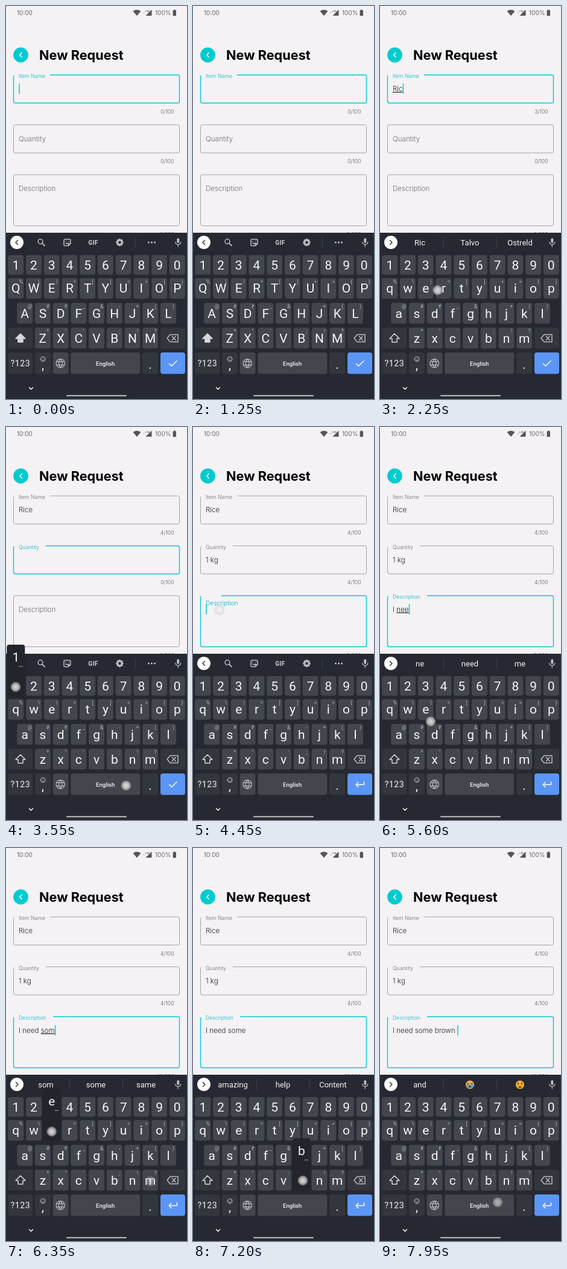
These frames come from a looping animation (300 px wide and 650 px high, 8 s). An HTML page:

```html
<!DOCTYPE html>
<html lang="en">
<head>
<meta charset="utf-8">
<title>New Request</title>
<style>
  html, body { margin: 0; width: 100%; height: 100%; overflow: hidden; background: #f4f2f5; }
  svg { display: block; width: 300px; height: 650px; }
  text { white-space: pre; }
  .app { font-family: Inter, sans-serif; font-weight: 300; font-size: 11.6px; fill: #222; }
  .app .title { font-weight: 700; font-size: 21.7px; fill: #000; }
  .app .status { font-size: 10px; font-weight: 400; fill: #66656a; }
  .app .count { font-size: 8.6px; fill: #555; text-anchor: end; }
  .word { text-decoration: underline; text-decoration-thickness: 1px; text-underline-offset: 2px; }
  .kb { font-family: Roboto, sans-serif; font-size: 21px; fill: #f3f4f6; text-anchor: middle; }
  .kb .hint { font-size: 8.5px; fill: #b0b3b9; }
  .kb .strip { font-size: 13px; }
  .kb .small { font-size: 9.6px; font-weight: 500; }
  .line { fill: none; stroke: #b9bcc2; stroke-width: 1.5; stroke-linecap: round; stroke-linejoin: round; }
</style>
</head>
<body>
<svg id="stage" viewBox="0 0 300 650"></svg>
<script>
const LOOP = 8000, LAG = 50, TEAL = '#00cbd0', GRAY = '#9a999d';
const stage = document.getElementById('stage');
const $ = id => document.getElementById(id);
const clamp = v => Math.max(0, Math.min(1, v));
const mix = (a, b, p) => a + (b - a) * p;

const fields = [
  { label: 'Item Name', y: 114, h: 46.5, base: 141, gap: 73, max: 100, focus: -500 },
  { label: 'Quantity', y: 196.5, h: 46.5, base: 224, gap: 66, max: 100, focus: 2890 },
  { label: 'Description', y: 279, h: 84.5, base: 305.7, gap: 78, max: 300, focus: 4375 }
];

// start, hold, key, optional touch point
const taps = [
  [1900, 70, 'r'], [1990, 60, 'i'], [2080, 60, 'c'], [2170, 60, 'e', 95.5, 470],
  [2750, 100, '', 70, 222],
  [3450, 120, '1', 16, 430], [3520, 90, ' ', 199, 593], [3720, 80, 'k'], [3950, 80, 'g'],
  [4250, 130, '', 43.5, 302.5],
  [4800, 80, 'i'], [4960, 60, ' '], [5120, 60, 'n'], [5270, 60, 'e'], [5400, 70, 'e'],
  [5500, 65, 'd', 84, 487], [5780, 60, ' '], [5950, 70, 's'], [6090, 70, 'o'],
  [6220, 60, 'm'], [6320, 60, 'e'], [6430, 60, ' '],
  [7195, 80, 'b', 182, 550], [7350, 60, 'r'], [7470, 60, 'o'], [7600, 60, 'w'],
  [7710, 60, 'n'], [7825, 70, ' ', 195, 586]
].map(([start, hold, key, x, y]) => ({ start, end: start + hold, key, x, y }));

const hints = {
  R: ['R', 'I', 'Are'], Ri: ['Ri', 'Rice', 'Right'], Ric: ['Ric', 'Talvo', 'Ostreld'],
  Rice: ['Rice', 'Rice is', 'Price'], '1 ': ['of', 'more', 'day'], k: ['k', 'kg', 'km'],
  kg: ['kg', 'kgs', 'keg'], i: ['i', 'I', "I'm"], 'I ': ['am', 'have', 'will'],
  n: ['n', 'no', 'need'], ne: ['ne', 'need', 'new'], nee: ['ne', 'need', 'me'],
  need: ['need', 'needed', 'needs'], 'need ': ['to', 'a', 'you'], s: ['s', 'some', 'so'],
  so: ['so', 'some', 'soon'], som: ['som', 'some', 'same'], some: ['some', 'someone', 'same'],
  'some ': ['amazing', 'help', 'Content'], b: ['b', 'be', 'but'], br: ['br', 'bread', 'bring'],
  bro: ['bro', 'brown', 'bring'], brow: ['brow', 'brown', 'brows'],
  brown: ['brown', 'browns', 'browse'], 'brown ': ['and', 'cry', 'tired']
};

// Keyboard layout
const rows = [
  { keys: '1234567890', marks: '', x: 16.3, y: 412, h: 32.5 },
  { keys: 'qwertyuiop', marks: '%\\|=[]<>{}', x: 16.3, y: 450, h: 34 },
  { keys: 'asdfghjkl', marks: '@#₹_&-+()', x: 31.2, y: 491, h: 34.5 },
  { keys: 'zxcvbnm', marks: '*"\':;!?', x: 60.9, y: 532, h: 34.5 }
];
const PITCH = 29.72, keyAt = { ' ': { x: 190, cy: 590 } };
const esc = s => s.replace('&', '&amp;').replace('<', '&lt;');
const box = (x, y, w, h, fill) => `<rect x="${x}" y="${y}" width="${w}" height="${h}" rx="4" fill="${fill}"/>`;
const text = (x, y, s, attrs = '') => `<text x="${x}" y="${y}" ${attrs}>${esc(s)}</text>`;
const line = (d, attrs = '') => `<path class="line" d="${d}" ${attrs}/>`;

const letterKeys = () => rows.map(r => [...r.keys].map((k, i) => {
  const x = r.x + i * PITCH, cy = r.y + r.h / 2;
  keyAt[k] = { x, cy, y: r.y };
  return box(x - 13, r.y, 26, r.h, '#43464d') +
    text(x, cy + 7.4, k, `data-key="${k}"`) +
    (r.marks ? text(x + 8.5, r.y + 8.5, r.marks[i], 'class="hint"') : '');
}).join('')).join('');

const specialKeys = () =>
  box(3.3, 532, 41, 34.5, '#33363d') + box(256, 532, 41, 34.5, '#33363d') +
  box(3.3, 573, 41, 35.5, '#33363d') + box(48, 573, 26, 35.5, '#33363d') +
  box(77.6, 573, 26, 35.5, '#43464d') + box(107.3, 573, 115, 35.5, '#43464d') +
  box(226, 573, 26, 35.5, '#33363d') + box(256, 573, 41, 35.5, '#5b95f6') +
  '<path id="shift" class="line" d="M24 542L32 550H28V556H20V550H16Z" style="stroke:#d5d7da"/>' +
  line('M267 549.5L272 543.5H285V555.5H272ZM275.5 546.5L281 552.5M281 546.5L275.5 552.5') +
  text(23.8, 596, '?123', 'style="font-size:14px;font-weight:500;letter-spacing:.5px;fill:#c9cbd0"') +
  text(61, 601, ',') + text(239, 600, '.') + text(164.7, 594.5, 'English', 'class="small"') +
  line('M57 584a4 4 0 1 0 8 0a4 4 0 1 0 -8 0M59 585.3q2 2.4 4 0M59.5 582.6v.2M62.5 582.6v.2', 'style="stroke-width:1"') +
  line('M83 591a7.2 7.2 0 1 0 14.4 0a7.2 7.2 0 1 0 -14.4 0M90.2 583.8q-6 7.2 0 14.4q6 -7.2 0 -14.4M84 588.3h12.4M84 593.7h12.4', 'style="stroke-width:1.2"') +
  line('M270.5 591.5L274.5 595.5L283 587', 'id="check" style="stroke:#fff"') +
  line('M283.5 587V591.5H270M274 587.5L270 591.5L274 595.5', 'id="return" style="stroke:#fff"');

const gear = () => {
  let d = '';
  for (let i = 0; i < 8; i++) {
    const a = i * Math.PI / 4, c = Math.cos(a), s = Math.sin(a);
    d += `M${188.5 + 4 * c} ${391 + 4 * s}L${188.5 + 6.2 * c} ${391 + 6.2 * s}`;
  }
  return line(d, 'style="stroke-width:3;stroke-linecap:butt"') +
    '<circle class="line" cx="188.5" cy="391" r="3.6" style="stroke-width:2.8"/>';
};

const toolbar = () => '<g id="tools">' +
  '<circle class="line" cx="57" cy="389.5" r="3.9"/>' + line('M60 392.5L64 396.5', 'style="stroke-width:1.8"') +
  line('M98 385.8H105Q107 385.8 107 387.8V393L103.5 396.5H98Q96 396.5 96 394.5V387.8Q96 385.8 98 385.8ZM107 393H103.5V396.5M99 392q2 2 4 0M99 389v.2M104 389v.2') +
  text(144.5, 394.6, 'GIF', 'style="font-size:10px;font-weight:900;fill:#b9bcc2;letter-spacing:.4px"') +
  gear() + '<path d="M214.5 383V399" stroke="#3c4048"/>' +
  [236.5, 241.5, 246.5].map(x => `<circle cx="${x}" cy="391" r="1.6" fill="#b9bcc2"/>`).join('') + '</g>';

const face = (x, extra) => `<g transform="translate(${x} 391.5)"><circle r="7" fill="#fbae3a"/>${extra}</g>`;

const suggestions = () => '<g id="words"><path d="M105.5 382V400M193.5 382V400" stroke="#3c4048"/>' +
  [66, 149, 232].map((x, i) => text(x, 395.8, '', `class="strip" id="word${i}"`)).join('') +
  '<g id="faces">' +
  face(149, '<path d="M-5-1.5h3.5v7.5h-3.5zM1.5-1.5h3.5v7.5h-3.5z" fill="#4a9ae8"/><path d="M-5-2h3.5M1.5-2h3.5" stroke="#5a3a1a"/><ellipse cy="3" rx="1.6" ry="2.3" fill="#5a3a1a"/>') +
  face(232, '<path d="M-4.5-3.5L-1.5-1.5L-4.5 0M4.5-3.5L1.5-1.5L4.5 0" fill="none" stroke="#5a3a1a"/><path d="M-3.5 5Q0-.5 3.5 5Z" fill="#7a3020"/>') +
  '</g></g>';

const statusBar = () => text(18, 14.6, '10:00', 'class="status"') + text(247, 14.6, '100%', 'class="status"') +
  '<g fill="#55545a"><path d="M210.5 8.6Q217 3.8 223.5 8.6L217 16.2Z"/><path d="M241.5 6V16H231.5Z"/>' +
  '<path d="M278 6h2.6v1.2h1.4v9h-5.4v-9h1.4z"/></g>' +
  text(231, 9.5, 'LTE', 'style="font-size:4px;font-weight:600;fill:#55545a"') +
  text(227, 13, '↑', 'style="font-size:4px;fill:#77767c"');

const fieldMarkup = (f, i) => `<path id="edge${i}" fill="none"/>
  <text id="label${i}" x="21">${f.label}</text>
  <text id="value${i}" x="21" y="${f.base}"><tspan></tspan><tspan class="word"></tspan></text>
  <text id="count${i}" class="count" x="278.5" y="${f.y + f.h + 17.3}"></text>`;

stage.innerHTML = `
  <defs><radialGradient id="touch">
    <stop offset="0" stop-color="#f4f2f4" stop-opacity=".88"/><stop offset=".5" stop-color="#e2e0e2" stop-opacity=".8"/>
    <stop offset=".8" stop-color="#c4c2c4" stop-opacity=".68"/><stop offset="1" stop-color="#a09ea0" stop-opacity=".4"/>
  </radialGradient></defs>
  <rect width="300" height="650" fill="#f4f2f5"/>
  <g class="app">${statusBar()}
    <circle cx="24.5" cy="81" r="12.4" fill="${TEAL}"/>
    ${line('M26.3 77.5L22.8 81L26.3 84.5', 'style="stroke:#fff"')}
    ${text(55, 88.6, 'New Request', 'class="title"')}
    ${fields.map(fieldMarkup).join('')}
    <rect id="caret" width="1.5" height="17" fill="${TEAL}"/>
  </g>
  <g class="kb">
    <rect y="375" width="300" height="275" fill="#262931"/>
    <circle cx="18" cy="391" r="11" fill="#fff"/>
    <path id="arrow" class="line" style="stroke:#33363d"/>
    ${toolbar()}${suggestions()}
    <rect x="283.3" y="384" width="4" height="8" rx="2" fill="#b9bcc2"/>
    ${line('M280.8 390.5q.5 4 4.5 4q4 0 4.5-4M285.3 394.7V398', 'style="stroke-width:1.3"')}
    ${letterKeys()}${specialKeys()}
    ${line('M38.5 631L41.5 634L44.5 631', 'style="stroke:#fff"')}
    <rect x="100" y="643.5" width="100" height="2" rx="1" fill="#c4c5c8"/>
    <g id="popup">${box(-15, -52, 30, 87, '#22252b')}
      <text id="popKey" y="-24"></text>
      <g fill="#dfe0e3"><circle cx="6" cy="-16" r=".7"/><circle cx="8.3" cy="-16" r=".7"/><circle cx="10.6" cy="-16" r=".7"/></g>
    </g>
  </g>
  ${taps.map((p, i) => `<circle id="dot${i}" r="8.3" fill="url(#touch)" stroke="#777" stroke-opacity=".3" stroke-width=".7"
    cx="${p.x ?? keyAt[p.key].x}" cy="${p.y ?? keyAt[p.key].cy + 2}"/>`).join('')}`;

const letters = [...stage.querySelectorAll('[data-key]')];
const show = (id, on) => { $(id).style.display = on ? '' : 'none'; };
const fieldAt = t => t < fields[1].focus ? 0 : t < fields[2].focus ? 1 : 2;

function edge({ y, h, gap }, p) {
  const b = y + h;
  const sides = `H284.5Q287.5 ${y} 287.5 ${y + 3}V${b - 3}Q287.5 ${b} 284.5 ${b}H15.5Q12.5 ${b} 12.5 ${b - 3}V${y + 3}`;
  return p > 0
    ? `M${mix(15, gap, p)} ${y}${sides}Q12.5 ${y + 2} 13.5 ${y + 1}`
    : `M15.5 ${y}${sides}Q12.5 ${y} 15.5 ${y}Z`;
}

function typed(t) {
  const values = ['', '', ''];
  let last = -250;
  for (const p of taps) {
    if (!p.key || p.end + LAG > t) continue;
    values[fieldAt(p.start)] += values[0] ? p.key : p.key.toUpperCase();
    last = p.end + LAG;
  }
  values[2] = values[2].replace(/^i /, 'I ');
  const focus = fields[fieldAt(t)].focus;
  return { values, last: Math.max(last, focus) };
}

function drawFields(t, active, values) {
  fields.forEach((f, i) => {
    const p = clamp((t - f.focus) / 150), on = i === active, label = $('label' + i);
    const path = $('edge' + i);
    path.setAttribute('d', edge(f, p));
    path.setAttribute('stroke', on ? TEAL : GRAY);
    path.setAttribute('stroke-width', on ? 1.4 : .9);
    label.setAttribute('y', mix(f.base, f.y + 5, p));
    label.style.fontSize = mix(11.6, 8.7, p) + 'px';
    label.style.fill = on ? '#00b8bd' : '#6c6b70';
    const [head, tail] = $('value' + i).children;
    const word = on ? values[i].match(/[a-z]*$/i)[0] : '';
    head.textContent = values[i].slice(0, values[i].length - word.length);
    tail.textContent = word;
    $('count' + i).textContent = values[i].length + '/' + f.max;
  });
}

function drawKeyboard(t, active, values) {
  const upper = !values[0];
  const fit = k => upper ? k.toUpperCase() : k;
  for (const el of letters) el.textContent = fit(el.dataset.key);
  $('shift').style.fill = upper ? '#d5d7da' : 'none';
  show('check', active < 2);
  show('return', active === 2);

  const list = hints[values[active].match(/\S*\s?$/)[0]];
  show('tools', !list);
  show('words', list);
  $('arrow').setAttribute('d', list ? 'M16.5 387.5L20 391L16.5 394.5' : 'M19.5 387.5L16 391L19.5 394.5');
  const faces = list && list[1] === 'cry';
  show('faces', faces);
  if (list) list.forEach((w, i) => { $('word' + i).textContent = faces && i ? '' : w; });

  const press = taps.find(p => p.key.trim() && t >= p.start && t < p.end);
  show('popup', press);
  if (press) {
    const { x, y } = keyAt[press.key];
    $('popup').setAttribute('transform', `translate(${x} ${y})`);
    $('popKey').textContent = fit(press.key);
  }
  taps.forEach((p, i) => {
    $('dot' + i).setAttribute('opacity', t < p.start ? 0 : clamp(1 - (t - p.end - 40) / 60));
  });
}

function draw() {
  const t = performance.now() % LOOP, active = fieldAt(t), { values, last } = typed(t);
  drawFields(t, active, values);
  drawKeyboard(t, active, values);
  const caret = $('caret');
  caret.setAttribute('x', 21.2 + (values[active] ? $('value' + active).getComputedTextLength() : 0));
  caret.setAttribute('y', fields[active].base - 12.7);
  show('caret', (t - last) % 1000 < 500);
  requestAnimationFrame(draw);
}
draw();
</script>
</body>
</html>
```
